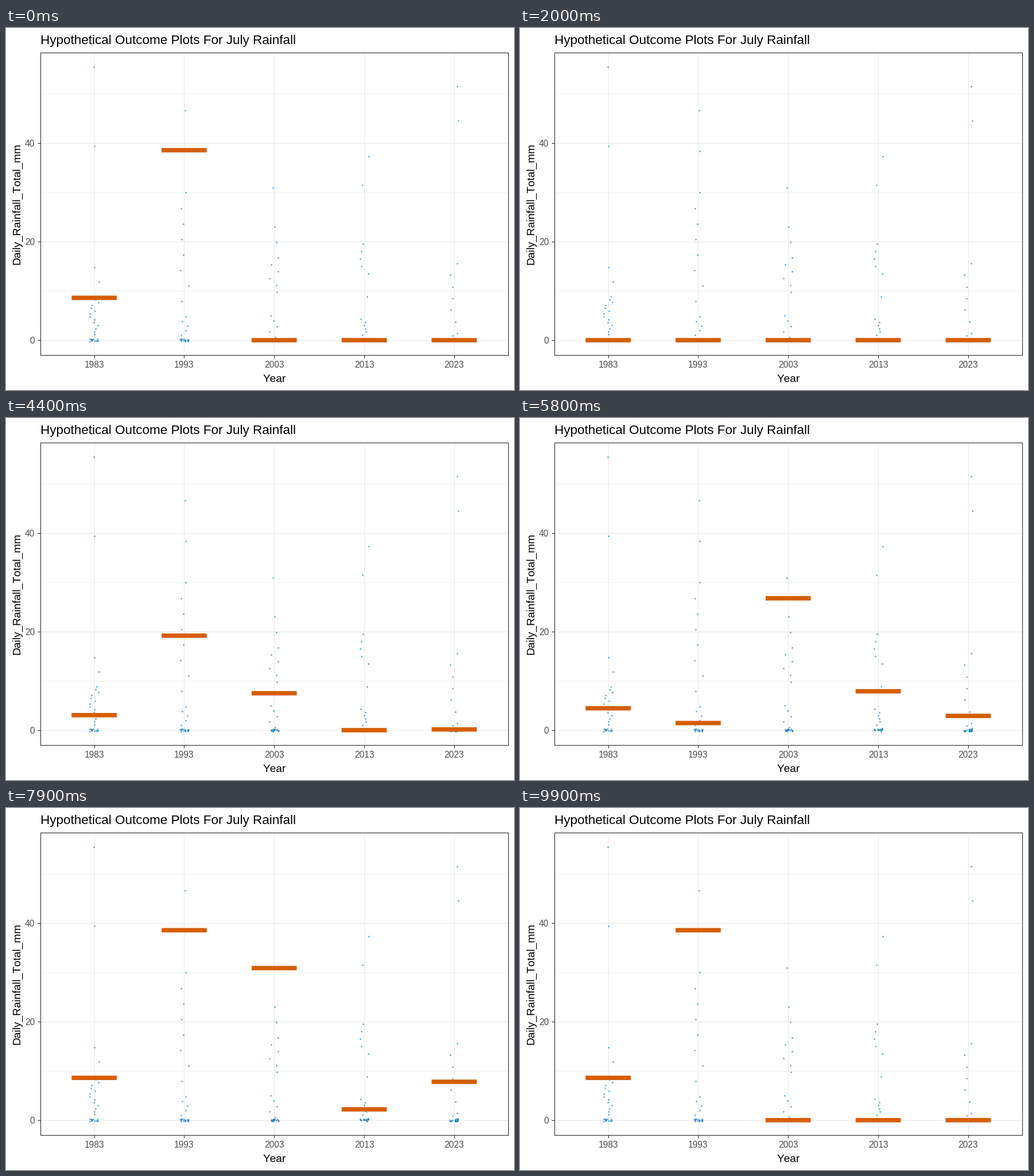
Recreate the animation shown at these times as a matplotlib script. Size 885 by 632 pixels, loop 10 s.

```python
import numpy as np
import matplotlib.pyplot as plt
from matplotlib.animation import FuncAnimation
from matplotlib.patches import Rectangle

W, H, DPI = 885, 632, 100
PX = 72 / DPI                       # points per pixel
LEFT, TOP, RIGHT, BOTTOM = 59.5, 42.5, 874.5, 570.5
X0, STEP = 153.6, 156.8             # first year and spacing
Y0, UNIT = 545, 8.592               # zero line and pixels per mm
BAR_W, BAR_H = 78.6, 7.7
STATES, DAYS = 20, 31
INK, GRID, LABEL = "#333333", "#EBEBEB", "#4D4D4D"
BLUE, ORANGE = "#0072B2", "#D55E00"

# Rainfall by rank of the wet days; ranks between are interpolated
RAIN = {
    1983: {0: 55.5, 1: 39.4, 2: 14.8, 4: 8.9, 17: 1.2},
    1993: {0: 46.7, 2: 30, 6: 17.3, 10: 4.8, 14: 1},
    2003: {0: 31, 1: 23, 3: 16.8, 8: 9.8, 9: 5, 13: .6},
    2013: {0: 37.4, 1: 31.5, 2: 19.5, 6: 13.5, 8: 4.3, 14: .4},
    2023: {0: 51.6, 1: 44.6, 2: 15.6, 8: 1.4, 10: .4},
}

# Outcome drawn in each state; states not listed are dry
DRAWS = {
    1983: {0: 8.6, 2: 1.9, 7: 39.4, 9: 6.1, 11: 8.9, 16: 8.6, 18: 4.8},
    1993: {0: 38.6, 8: 21, 9: 17.4, 11: 2.9, 13: 38.6, 16: 38.6, 17: 20},
    2003: {1: 30.9, 2: 9.5, 5: 9.5, 8: 15, 11: 22.7, 12: 30.9, 14: 12, 16: 30.9},
    2013: {11: 15.8, 16: 2.2},
    2023: {3: 44.4, 6: .4, 9: .3, 11: 5.8, 16: 7.8, 17: 7.8},
}


def year_x(i):
    return X0 + STEP * i


def rain_y(mm):
    return Y0 - UNIT * mm


plt.rcParams.update({"font.family": "Liberation Sans",
                     "text.hinting": "no_autohint",
                     "text.kerning_factor": 6})
fig = plt.figure(figsize=(W / DPI, H / DPI), dpi=DPI, facecolor="white")
ax = fig.add_axes([0, 0, 1, 1])
ax.set(xlim=(0, W), ylim=(H, 0))
ax.axis("off")


def line(xs, ys, color, width=1.15):
    ax.plot(xs, ys, color=color, lw=width * PX, zorder=1,
            solid_capstyle="butt")


def text(x, y, s, size, color="black", ha="center", rotation=0):
    ax.text(x, y, s, fontsize=size * PX, color=color, ha=ha, va="baseline",
            rotation=rotation, rotation_mode="anchor")


# Panel, grid and axes
for mm in range(0, 60, 10):
    y = rain_y(mm)
    major = mm in (0, 20, 40)
    line((LEFT, RIGHT), (y, y), GRID, 1.15 if major else .6)
    if major:
        line((LEFT - 5, LEFT), (y, y), INK)
        text(50.3, y + 5.6, str(mm), 15.5, LABEL, "right")
for i, year in enumerate(RAIN):
    x = year_x(i)
    line((x, x), (TOP, BOTTOM), GRID)
    line((x, x), (BOTTOM, BOTTOM + 5), INK)
    text(x, 593, str(year), 15.5, LABEL)
ax.add_patch(Rectangle((LEFT, TOP), RIGHT - LEFT, BOTTOM - TOP, fill=False,
                       ec=INK, lw=1.15 * PX, zorder=5))
text(59.7, 28, "Hypothetical Outcome Plots For July Rainfall", 22.5, ha="left")
text(467.2, 618.5, "Year", 19)
text(24.5, 307, "Daily_Rainfall_Total_mm", 19, rotation=90)

# Daily totals with jitter; dry days cluster around zero
rng = np.random.default_rng(7)
for i, keys in enumerate(RAIN.values()):
    ranks = np.arange(max(keys) + 1)
    wet = np.interp(ranks, list(keys), list(keys.values()))
    dry = rng.uniform(-.28, .3, DAYS - len(wet))
    xs = year_x(i) + rng.uniform(-8, 8, DAYS)
    ax.scatter(xs, rain_y(np.append(wet, dry)), s=(2.7 * PX) ** 2,
               color=BLUE, alpha=.62, lw=0, zorder=3)

bars = [ax.add_patch(Rectangle((year_x(i) - BAR_W / 2, 0), BAR_W, BAR_H,
                               color=ORANGE, lw=0, snap=False, zorder=4))
        for i in range(len(DRAWS))]


def update(n):
    # Four held frames and one halfway frame per state; one state is a frame short
    state, phase = divmod(n + (n >= 53), 5)
    t = .5 if phase == 4 else 0
    for bar, draws in zip(bars, DRAWS.values()):
        a = draws.get(state % STATES, 0)
        b = draws.get((state + 1) % STATES, 0)
        bar.set_y(rain_y(a + (b - a) * t) - BAR_H / 2)
    return bars


anim = FuncAnimation(fig, update, frames=100, interval=100, repeat=True)
plt.show()
```
